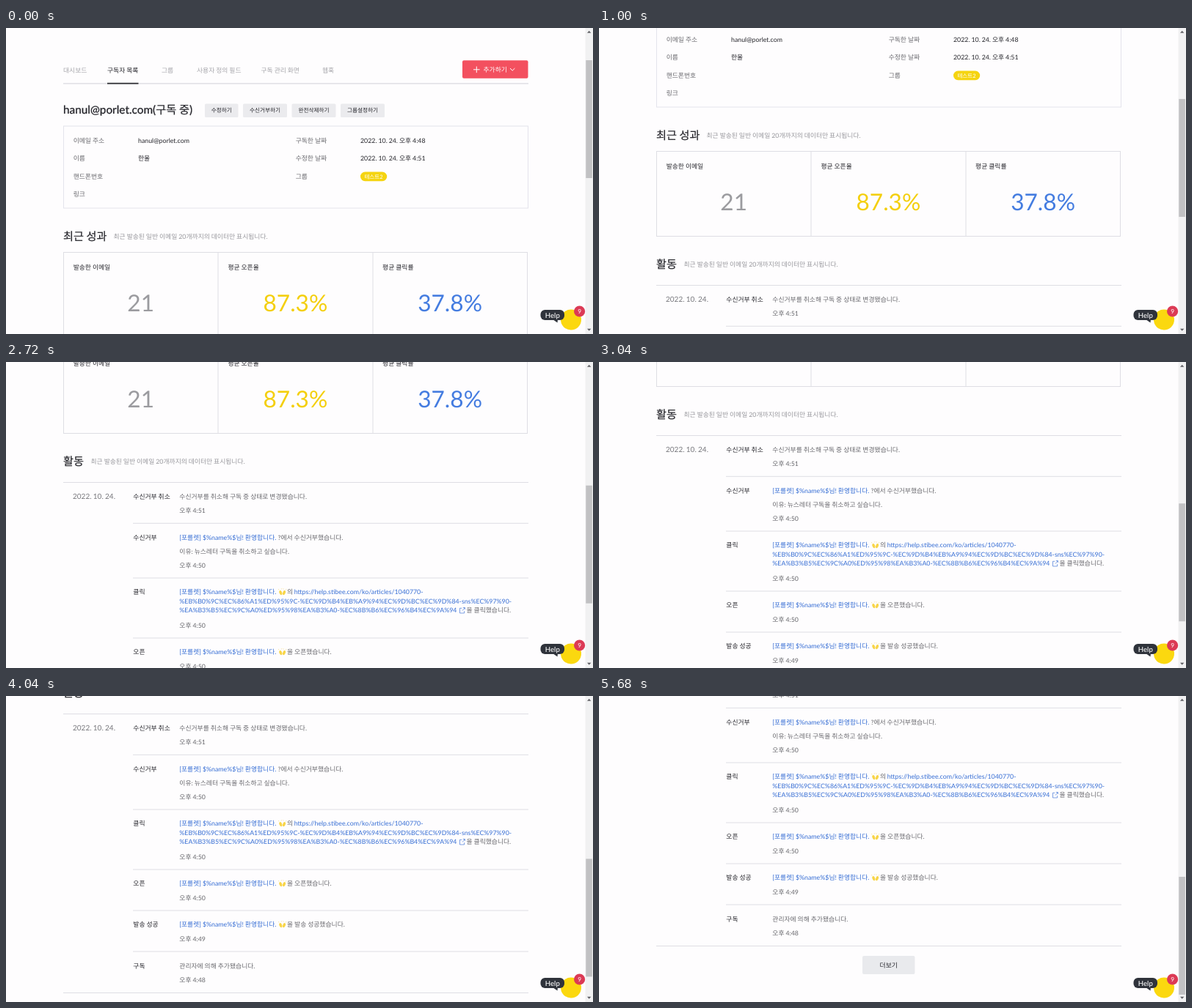
An HTML page for the animation above (5.76 s loop, 800 px wide and 418 px high).

```html
<!DOCTYPE html>
<html lang="ko">
<head>
<meta charset="utf-8">
<title>구독자 상세</title>
<style>
  html, body { margin: 0; width: 100%; height: 100%; overflow: hidden; background: #fefdfe; }
  svg { display: block; width: 800px; height: 418px; }
  text {
    font-family: Lato, "Noto Sans CJK KR", "Noto Sans CJK", "Noto Sans CJK JP", sans-serif;
    text-rendering: geometricPrecision;
    word-spacing: -0.3px;
    white-space: pre;
  }
</style>
</head>
<body>
<svg id="stage" viewBox="0 0 800 418"><g id="page"></g><g id="overlay"></g></svg>
<script>
const NS = 'http://www.w3.org/2000/svg';
const LOOP = 5760, STEP = 40;
const DARK = '#25252b', GREY = '#68686d', PALE = '#a5a5aa', LINK = '#356dd4', RULE = '#dedee4';
const page = document.getElementById('page');
const overlay = document.getElementById('overlay');
let layer = page;

function add(tag, attrs) {
  const el = document.createElementNS(NS, tag);
  for (const k in attrs) el.setAttribute(k, attrs[k]);
  layer.appendChild(el);
  return el;
}
// y is the middle of the line
function text(str, x, y, fill = GREY, size = 8.8, opts = {}) {
  const el = add('text', { x, y: y + size * 0.365, fill, 'font-size': size, ...opts });
  el.textContent = str;
}
const MID = { 'text-anchor': 'middle' };
const MEDIUM = { 'font-weight': 500 };
const TITLE = { ...MEDIUM, stroke: DARK, 'stroke-width': 0.2 };
const box = (x, y, width, height, fill, rx = 0) => add('rect', { x, y, width, height, fill, rx });
const frame = (x, y, width, height, stroke = RULE) =>
  add('rect', { x, y, width, height, fill: 'none', stroke, 'stroke-width': 1 });
const path = (d, stroke, w = 1, fill = 'none') => add('path', { d, stroke, fill, 'stroke-width': w });
const rule = (x, y) => path(`M${x} ${y}H712`, RULE);

function tabs() {
  [['대시보드', 78], ['그룹', 212], ['사용자 정의 필드', 260], ['구독 관리 화면', 347.5], ['웹훅', 431]]
    .forEach(([s, x]) => text(s, x, 58, PALE));
  text('구독자 목록', 138, 58, DARK, 8.8, MEDIUM);
  path('M78 75.8H712', '#dadae0', 1.2);
  box(138, 74.8, 42.5, 1.8, '#333338');
  box(622, 44.2, 89.5, 24.5, '#f3505f', 2);
  path('M637 56.8H645.6M641.3 52.5V61.1', '#fff');
  text('추가하기', 650.5, 56.5, '#fff', 8.8, MEDIUM);
  path('M687 55L690.2 58.2L693.4 55', '#fff');
}

function profile() {
  text('hanul@porlet.com(구독 중)', 78, 111, DARK, 15.3, TITLE);
  [['수정하기', 271, 45.5], ['수신거부하기', 323, 60], ['완전삭제하기', 389.5, 60], ['그룹설정하기', 456, 60]]
    .forEach(([s, x, w]) => {
      box(x, 103.5, w, 18.5, '#ebebee', 1.5);
      text(s, x + w / 2, 112.6, DARK, 7.64, MID);
    });
  frame(78.5, 134, 633, 112, '#e4e4ec');
  ['이메일 주소', '이름', '핸드폰번호', '링크'].forEach((s, i) => text(s, 91.7, 153.3 + i * 24.6));
  ['구독한 날짜', '수정한 날짜', '그룹'].forEach((s, i) => text(s, 394.7, 153.3 + i * 24.6));
  text('hanul@porlet.com', 180, 153.3, DARK);
  text('한울', 180, 177.9, DARK);
  text('2022. 10. 24. 오후 4:48', 483, 153.3, DARK);
  text('2022. 10. 24. 오후 4:51', 483, 177.9, DARK);
  box(483, 196.6, 36.2, 12.6, '#f5d410', 6.3);
  text('테스트2', 501, 203, '#fff', 7.5, MID);
}

function stats() {
  const note = '최근 발송된 일반 이메일 20개까지의 데이터만 표시됩니다.';
  text('최근 성과', 78, 284, DARK, 15.2, TITLE);
  text(note, 146.5, 284.5, '#97979c');
  frame(78.5, 306.5, 632, 116);
  path('M289 306.5V422.5M500 306.5V422.5', RULE);
  [['발송한 이메일', '21', '#9b9b9f'], ['평균 오픈율', '87.3%', '#f4cf0c'], ['평균 클릭률', '37.8%', '#447ce0']]
    .forEach(([label, value, color], i) => {
      text(label, 91.7 + i * 210.7, 326.5, DARK, 8.8, MEDIUM);
      text(value, 183.7 + i * 210.7, 375.7, color, 31.6, MID);
    });
  text('활동', 78, 460, DARK, 15.2, TITLE);
  text(note, 115.5, 460.5, '#97979c');
}

function hands(x, y) {
  [-1, 1].forEach(s => {
    const cx = x + s * 2.7;
    add('ellipse', { cx, cy: y + 1, rx: 1.8, ry: 3.2, fill: '#f8d548', transform: `rotate(${s * 20} ${cx} ${y})` });
    path(`M${x + s * 1.6} ${y - 3.6}l${-s * 0.6} -1.3M${x + s * 4.6} ${y - 2.8}l${s * 0.7} -1.4`, '#f6e3a0', 0.9);
  });
}

function mail(y, tail, icon = true) {
  text('[포를렛] $%name%$님! 환영합니다.', 236.3, y, LINK);
  if (icon) hands(376.7, y);
  text(tail, icon ? 383 : 370.5, y);
}

function activity() {
  rule(78, 489.5);
  text('2022. 10. 24.', 91, 508.5, '#77777c', 10);
  [['수신거부 취소', 508.7, 527.7, '4:51'], ['수신거부', 564.5, 602.3, '4:50'], ['클릭', 639.2, 684.5, '4:50'],
   ['오픈', 721.2, 740.4, '4:50'], ['발송 성공', 777.2, 796.5, '4:49'], ['구독', 833.3, 852.9, '4:48']]
    .forEach(([label, y, timeY, time]) => {
      text(label, 173.3, y, DARK, 8.8, MEDIUM);
      text('오후 ' + time, 236.3, timeY);
    });
  [545.3, 620, 702, 758, 814].forEach(y => rule(173, y));

  text('수신거부를 취소해 구독 중 상태로 변경됐습니다.', 236.3, 508.7);
  mail(564.5, '?에서 수신거부했습니다.', false);
  text('이유: 뉴스레터 구독을 취소하고 싶습니다.', 236.3, 583.3);

  mail(639.2, '의');
  text('https://help.stibee.com/ko/articles/1040770-', 392.7, 639.2, LINK);
  text('%EB%B0%9C%EC%86%A1%ED%95%9C-%EC%9D%B4%EB%A9%94%EC%9D%BC%EC%9D%84-sns%EC%97%90-', 236.3, 651.8, LINK);
  text('%EA%B3%B5%EC%9C%A0%ED%95%98%EA%B3%A0-%EC%8B%B6%EC%96%B4%EC%9A%94', 236.3, 664.2, LINK);
  path('M621.3 661.3H618.5V668H624.6V665.2M622 664.6L625.2 660.8M622.8 660.5H625.4V663.1', LINK, 0.65);
  text('을 클릭했습니다.', 627.5, 664.2);

  mail(721.2, '을 오픈했습니다.');
  mail(777.2, '을 발송 성공했습니다.');
  text('관리자에 의해 추가됐습니다.', 236.3, 833.3);

  rule(78, 870.5);
  box(359, 884, 71.5, 25, '#e9eaed', 2);
  text('더보기', 394.7, 896.3, DARK, 8.8, MID);
}

function widget() {
  add('circle', { cx: 770, cy: 398.5, r: 14, fill: '#fbd80f' });
  box(728.5, 385, 32.5, 14, '#2f333b', 6);
  path('M745 398L751.5 402.5L752 398Z', 'none', 0, '#2f333b');
  text('Help', 744.8, 392, '#fff', 9.6, { ...MID, ...MEDIUM });
  add('circle', { cx: 781.6, cy: 387, r: 7.6, fill: '#dc3a55' });
  text('9', 781.6, 387, '#fff', 8.4, MID);
}

function scrollbar() {
  box(789.5, 0, 10.5, 418, '#f1f1f2');
  path('M792 6.8L794.7 3.8L797.4 6.8Z', 'none', 0, '#606064');
  path('M792 410.8L794.7 413.8L797.4 410.8Z', 'none', 0, '#606064');
  return box(790.3, 44, 8.6, 161, '#c1c1c3');
}

// [ms, scroll] with eased slopes in between
const KEYS = [[0, 0], [1000, 138], [1880, 272], [2320, 325], [2700, 325], [3360, 447],
              [3860, 447], [4040, 465], [4240, 503], [4480, 529], [LOOP, 529]];
const rate = i => (KEYS[i + 1][1] - KEYS[i][1]) / (KEYS[i + 1][0] - KEYS[i][0]);
function slope(i) {
  if (i === 0) return rate(0);
  if (i === KEYS.length - 1) return 0;
  const a = rate(i - 1), b = rate(i);
  return a * b > 0 ? 2 * a * b / (a + b) : 0;
}
function scrollAt(t) {
  let i = 0;
  while (i < KEYS.length - 2 && t >= KEYS[i + 1][0]) i++;
  const [t0, p] = KEYS[i], [t1, q] = KEYS[i + 1];
  const d = t1 - t0, u = (t - t0) / d, v = 1 - u;
  return p * v * v * (1 + 2 * u) + q * u * u * (3 - 2 * u) +
         d * u * v * (slope(i) * v - slope(i + 1) * u);
}

tabs();
profile();
stats();
activity();
layer = overlay;
const thumb = scrollbar();
widget();

const start = performance.now();
function draw() {
  const t = Math.floor(((performance.now() - start) % LOOP) / STEP) * STEP;
  const y = Math.round(scrollAt(t));
  page.setAttribute('transform', `translate(0 ${-y})`);
  thumb.setAttribute('y', 44 + y * 0.3837);
  requestAnimationFrame(draw);
}
draw();
</script>
</body>
</html>
```
